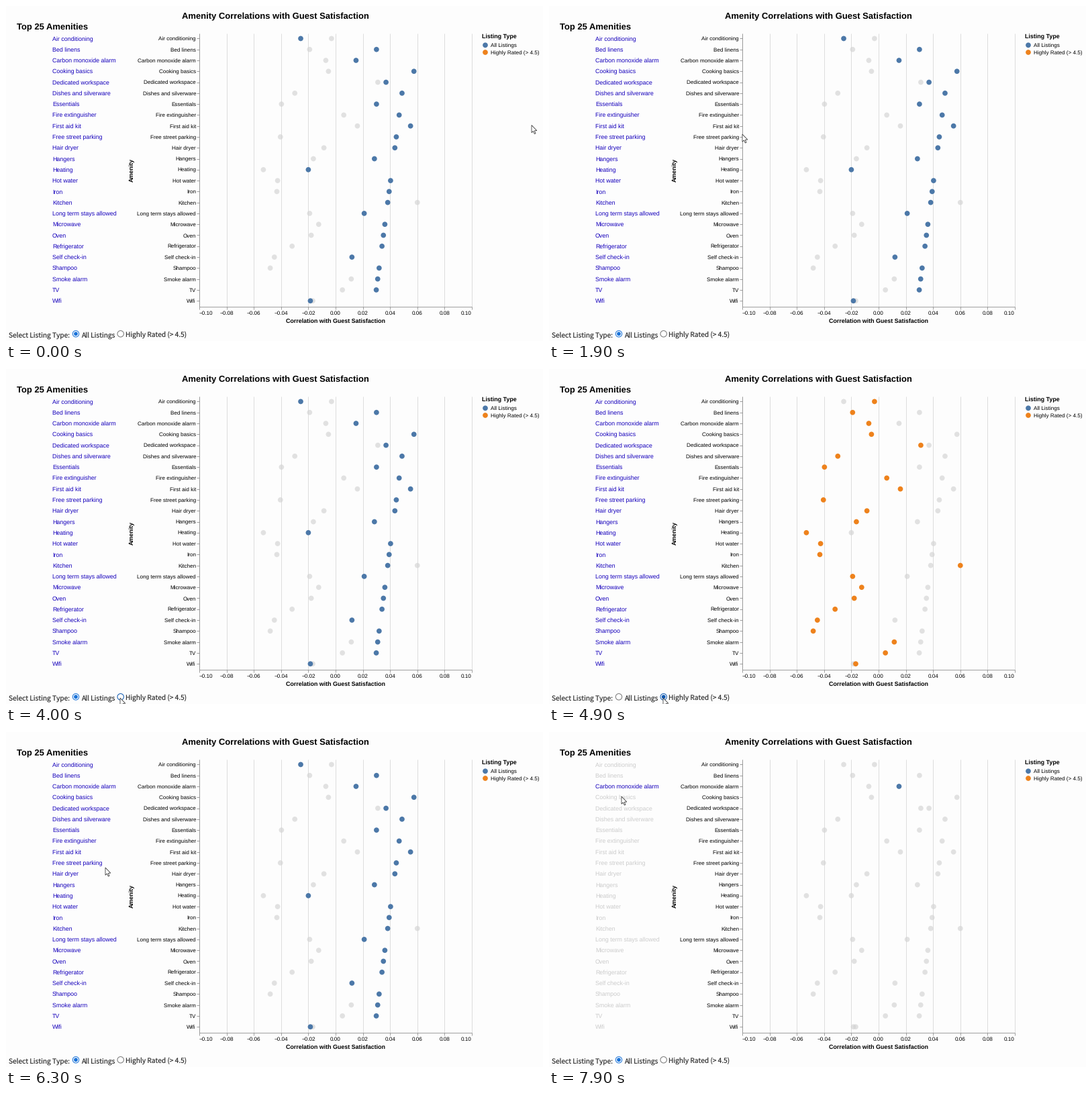
Recreate the animation shown at these times as a matplotlib script. Size 800 px wide and 499 px high, loop 8000 ms.

```python
import numpy as np
import matplotlib.pyplot as plt
from matplotlib.animation import FuncAnimation
from matplotlib.patches import Circle, Polygon

W, H, DPI = 800, 499, 64
STEP, FRAMES = 100, 80
BLUE, ORANGE, GREY = "#4c78a8", "#ee821c", "#d3d3d3"
LINK, FADED, AXIS, GRID = "#1500bc", "#cccccc", "#888888", "#dddddd"
RADIO_ON, RADIO_PRESS, RADIO_OFF = "#1a73d9", "#0b57b0", "#767676"
SMALL, MEDIUM, LARGE = 8.125, 8.94, 13
LEFT, RIGHT, TOP, BOTTOM = 288, 694, 40.5, 447.5
PICKED = "Carbon monoxide alarm"

AMENITIES = [
    "Air conditioning", "Bed linens", "Carbon monoxide alarm",
    "Cooking basics", "Dedicated workspace", "Dishes and silverware",
    "Essentials", "Fire extinguisher", "First aid kit",
    "Free street parking", "Hair dryer", "Hangers", "Heating", "Hot water",
    "Iron", "Kitchen", "Long term stays allowed", "Microwave", "Oven",
    "Refrigerator", "Self check-in", "Shampoo", "Smoke alarm", "TV", "Wifi",
]
ROW = (BOTTOM - TOP) / len(AMENITIES)

# Amenities that stand clear of the general trend
ALL_KEYS = {
    "Air conditioning": -0.0256, "Bed linens": 0.03,
    "Carbon monoxide alarm": 0.015, "Cooking basics": 0.0575,
    "Dedicated workspace": 0.037, "Essentials": 0.03,
    "First aid kit": 0.055, "Hangers": 0.0285, "Heating": -0.02,
    "Long term stays allowed": 0.021, "Self check-in": 0.012,
    "Wifi": -0.0185,
}
HIGH_KEYS = {
    "Air conditioning": -0.003, "Dedicated workspace": 0.031,
    "Fire extinguisher": 0.006, "First aid kit": 0.016,
    "Free street parking": -0.0405, "Heating": -0.053, "Kitchen": 0.06,
    "Smoke alarm": 0.0115, "TV": 0.005,
}


def correlations(row, name):
    falling = 0.054 - 0.00105 * row
    wave = 0.017 * np.cos(2 * np.pi * (row - 2.7) / 7.2) - 0.02 - 0.00055 * row
    return ALL_KEYS.get(name, falling), HIGH_KEYS.get(name, wave)


plt.rcParams["text.hinting"] = "none"
plt.rcParams["toolbar"] = "None"
fig = plt.figure(figsize=(W / DPI, H / DPI), dpi=DPI, facecolor="#fdfdfd")
ax = fig.add_axes([0, 0, 1, 1])
ax.set(xlim=(0, W), ylim=(H, 0))
ax.axis("off")


def px(size):
    return size * 72 / DPI


def label(x, y, text, size, color="black", font="Liberation Sans", **kw):
    return ax.text(x, y, text, fontsize=px(size), color=color, family=font,
                   **kw)


def line(x0, y0, x1, y1, color=AXIS, width=0.8):
    ax.plot([x0, x1], [y0, y1], color=color, lw=px(width), zorder=1,
            solid_capstyle="butt")


def dot(x, y, r, color):
    return ax.add_patch(Circle((x, y), r, fc=color, lw=0, zorder=3))


def x_of(value):
    return (LEFT + RIGHT) / 2 + value * (RIGHT - LEFT) / 0.2


# Titles
label(401.5, 19, "Amenity Correlations with Guest Satisfaction", LARGE,
      ha="center", weight="bold")
label(16, 35, "Top 25 Amenities", LARGE, weight="bold")
label(491, 472, "Correlation with Guest Satisfaction", MEDIUM, ha="center",
      weight="bold")
label(187.5, 244.5, "Amenity", MEDIUM, ha="center", va="center",
      weight="bold", rotation=90)

# Axes
for value in np.linspace(-0.1, 0.1, 11).round(2) + 0.0:
    x = x_of(value)
    line(x, TOP, x, BOTTOM, GRID, 1)
    line(x, BOTTOM, x, BOTTOM + 4)
    ha = {-0.1: "left", 0.1: "right"}.get(value, "center")
    label(x, 460, f"{value:.2f}".replace("-", "\u2212"), SMALL, ha=ha)
line(LEFT, TOP, LEFT, BOTTOM)
line(LEFT, BOTTOM, RIGHT, BOTTOM)

links, dots = [], []
for row, name in enumerate(AMENITIES):
    y = TOP + (row + 0.5) * ROW - 0.2
    line(LEFT - 4, y, LEFT, y)
    label(283, y + 3, name, SMALL, ha="right")
    links.append(label(69, y + 3.2, name, MEDIUM))
    dots.append([dot(x_of(v), y, 3.85, GREY)
                 for v in correlations(row, name)])

# Legend
label(709, 48, "Listing Type", MEDIUM, weight="bold")
for y, color, text in ((58.3, BLUE, "All Listings"),
                       (69, ORANGE, "Highly Rated (> 4.5)")):
    dot(714, y, 3.85, color)
    label(722, y + 3, text, SMALL)

# Radio buttons
for x, text in ((4, "Select Listing Type:"), (112, "All Listings"),
                (178.5, "Highly Rated (> 4.5)")):
    label(x, 493, text, 10.1, "#3a3a3a", "Noto Sans CJK JP")
radios = []
for x in (104, 170.7):
    ring = ax.add_patch(Circle((x, 488.3), 4.7, fc="white", lw=px(1)))
    radios.append((ring, dot(x, 488.3, 2.9, RADIO_ON)))

ARROW = np.array([(0, 0), (0, 11.2), (2.5, 8.9), (4.3, 13), (6, 12.3),
                  (4.3, 8.3), (7.8, 8.1)])
cursor = ax.add_patch(Polygon(ARROW, fc="white", ec="#333333", lw=px(0.8),
                              zorder=10, joinstyle="miter"))

# Pointer moves: start ms, end ms, destination
START = (783, 177.5)
MOVES = [
    (0, 300, (595, 200)), (600, 900, (288, 191)), (1900, 2600, (420, 345)),
    (2600, 2700, (186, 502)), (2900, 3300, (170, 490)),
    (4900, 5500, (104, 488)), (5800, 6300, (148, 202)),
    (6500, 7000, (109, 83.5)), (7700, 7900, (108, 96)),
]


def pointer(t):
    tip = np.array(START, float)
    for begin, end, goal in MOVES:
        tip += (goal - tip) * np.clip((t - begin) / (end - begin), 0, 1)
    return tip


def draw(frame):
    t = frame * STEP
    active = int(4200 <= t < 5700)

    for name, link, pair in zip(AMENITIES, links, dots):
        chosen = t < 7500 or name == PICKED
        link.set_color(LINK if chosen else FADED)
        for kind, mark in enumerate(pair):
            on = chosen and kind == active
            mark.set_facecolor((BLUE, ORANGE)[kind] if on else GREY)
            mark.set_alpha(1 if on else 0.65)
            mark.set_zorder(4 if on else 3)

    for kind, (ring, core) in enumerate(radios):
        on = kind == active
        pressed = kind == 1 and 4000 <= t < 5000
        color = RADIO_PRESS if pressed else RADIO_ON if on else RADIO_OFF
        ring.set_edgecolor(color)
        core.set_facecolor(color)
        core.set_visible(on)

    cursor.set_xy(ARROW + pointer(t))
    return []


anim = FuncAnimation(fig, draw, frames=FRAMES, interval=STEP, repeat=True,
                     repeat_delay=0, blit=False)
plt.show()
```
